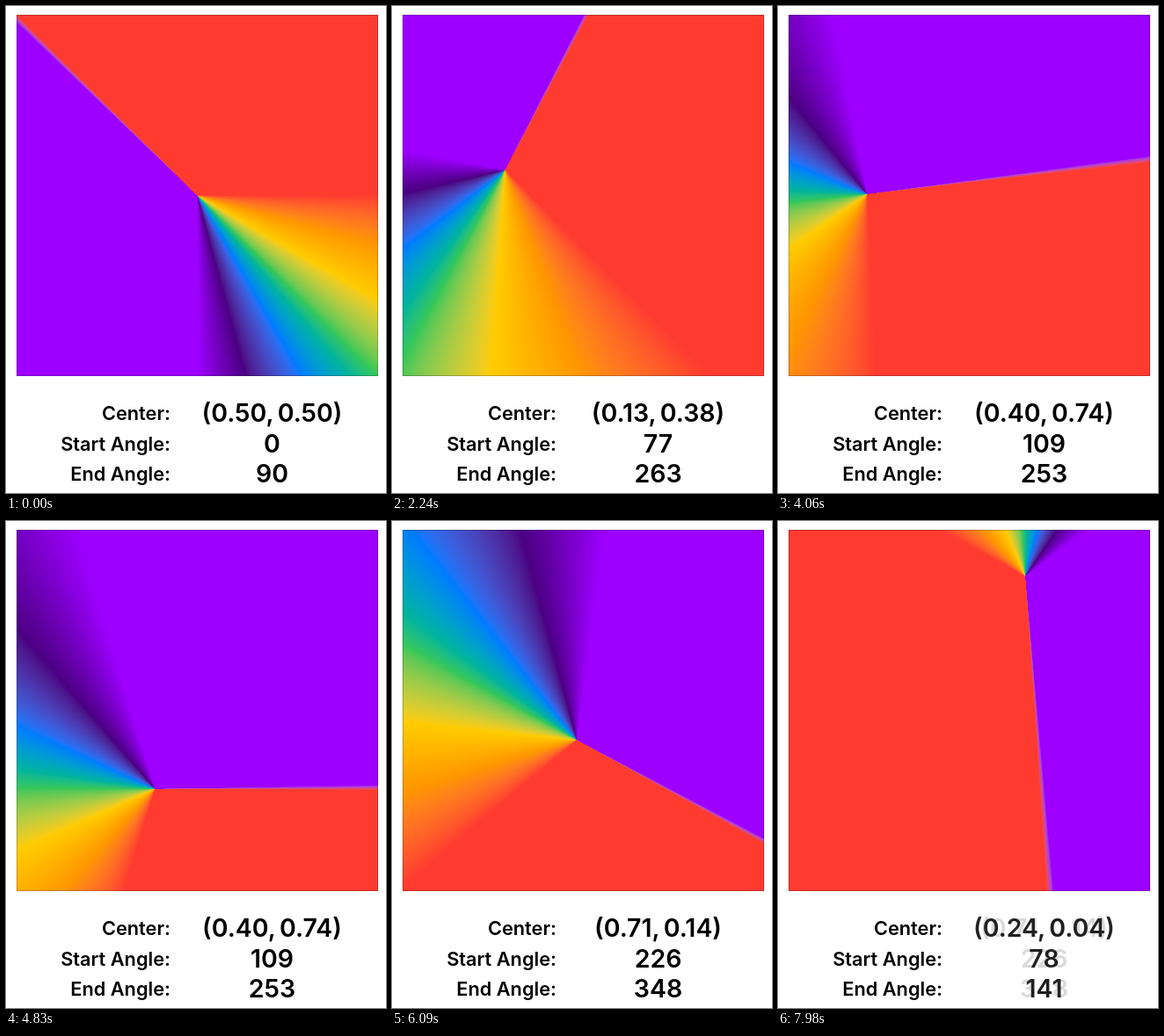
Write an HTML page that moves like this. It is 432 by 554 pixels and loops after 8 s.

```html
<!DOCTYPE html>
<html lang="en">
<head>
<meta charset="utf-8">
<title>Angular gradient</title>
<style>
  html, body { margin: 0; width: 100%; height: 100%; overflow: hidden; background: #fff; }
  #gradient {
    position: absolute; left: 12px; top: 10px; width: 411px; height: 411px;
    box-shadow: inset 0 0 0 1px rgba(0, 0, 0, .22);
  }
  svg { position: absolute; left: 0; top: 0; }
  text { font: 600 21.75px Inter, sans-serif; fill: #000; text-anchor: end; }
  .value text { font-size: 28.5px; word-spacing: -2.5px; text-anchor: middle; }
</style>
</head>
<body>
<div id="gradient"></div>
<svg width="432" height="554">
  <text x="187" y="471">Center:</text>
  <text x="187" y="505.5">Start Angle:</text>
  <text x="187" y="540">End Angle:</text>
  <g class="value" id="previous"></g>
  <g class="value" id="current"></g>
</svg>
<script>
const LOOP = 8000, STEP = 70;
const FIRST_CHANGE = 1250, PERIOD = 2100, DURATION = 1800, TEXT_FADE = 500;
const COLORS = ['#ff3b30', '#ff9500', '#ffcc00', '#34c759', '#007aff', '#4b0082', '#9d00ff'];
const SEAM_WIDTH = 1.2;

// center x, center y, start angle, end angle
const STATES = [
  [0.50, 0.50, 0, 90],
  [0.13, 0.38, 77, 263],
  [0.40, 0.74, 109, 253],
  [0.71, 0.14, 226, 348],
  [0.24, 0.04, 78, 141]
];

const byId = id => document.getElementById(id);
const clamp = v => Math.min(1, Math.max(0, v));

// cubic-bezier(.42, 0, .58, 1), solved by bisection
function easeInOut(x) {
  let lo = 0, hi = 1;
  for (let i = 0; i < 20; i++) {
    const s = (lo + hi) / 2, r = 1 - s;
    if (1.26 * s * r * r + 1.74 * s * s * r + s * s * s < x) lo = s; else hi = s;
  }
  return lo * lo * (3 - 2 * lo);
}

function makeValues(group) {
  return [473, 507.5, 542].map(y => {
    const text = document.createElementNS('http://www.w3.org/2000/svg', 'text');
    text.setAttribute('x', 302.5);
    text.setAttribute('y', y);
    group.appendChild(text);
    return text;
  });
}

function showValues(view, [x, y, start, end], opacity) {
  const labels = [`(${x.toFixed(2)}, ${y.toFixed(2)})`, start, end];
  view.lines.forEach((line, i) => { line.textContent = labels[i]; });
  view.group.style.opacity = opacity;
}

const [previous, current] = ['previous', 'current'].map(id => {
  const group = byId(id);
  return { group, lines: makeValues(group) };
});

function drawGradient([x, y, start, end]) {
  const span = end - start, seam = span / 2 + 180, last = COLORS.length - 1;
  const stops = COLORS.map((color, i) => `${color} ${span * i / last}deg`);
  // the last colour fills up to the seam, the first one the rest
  stops.push(`${COLORS[last]} ${seam - SEAM_WIDTH}deg`, `${COLORS[0]} ${seam}deg`);
  // CSS measures from the top, the states from the right
  byId('gradient').style.background =
    `conic-gradient(from ${start + 90}deg at ${x * 100}% ${y * 100}% in oklab, ${stops.join(', ')})`;
}

function render(time) {
  const index = Math.max(0, Math.floor((time - FIRST_CHANGE) / PERIOD) + 1);
  const elapsed = time - FIRST_CHANGE - (index - 1) * PERIOD;
  const from = STATES[Math.max(0, index - 1)], to = STATES[index];
  const progress = easeInOut(clamp(elapsed / DURATION));
  drawGradient(from.map((v, i) => v + (to[i] - v) * progress));

  const shown = index ? clamp(elapsed / TEXT_FADE) : 1;
  showValues(previous, from, 1 - shown);
  showValues(current, to, shown);
}

function tick() {
  const time = performance.now() % LOOP;
  render(Math.floor(time / STEP) * STEP);
  requestAnimationFrame(tick);
}
tick();
</script>
</body>
</html>
```
